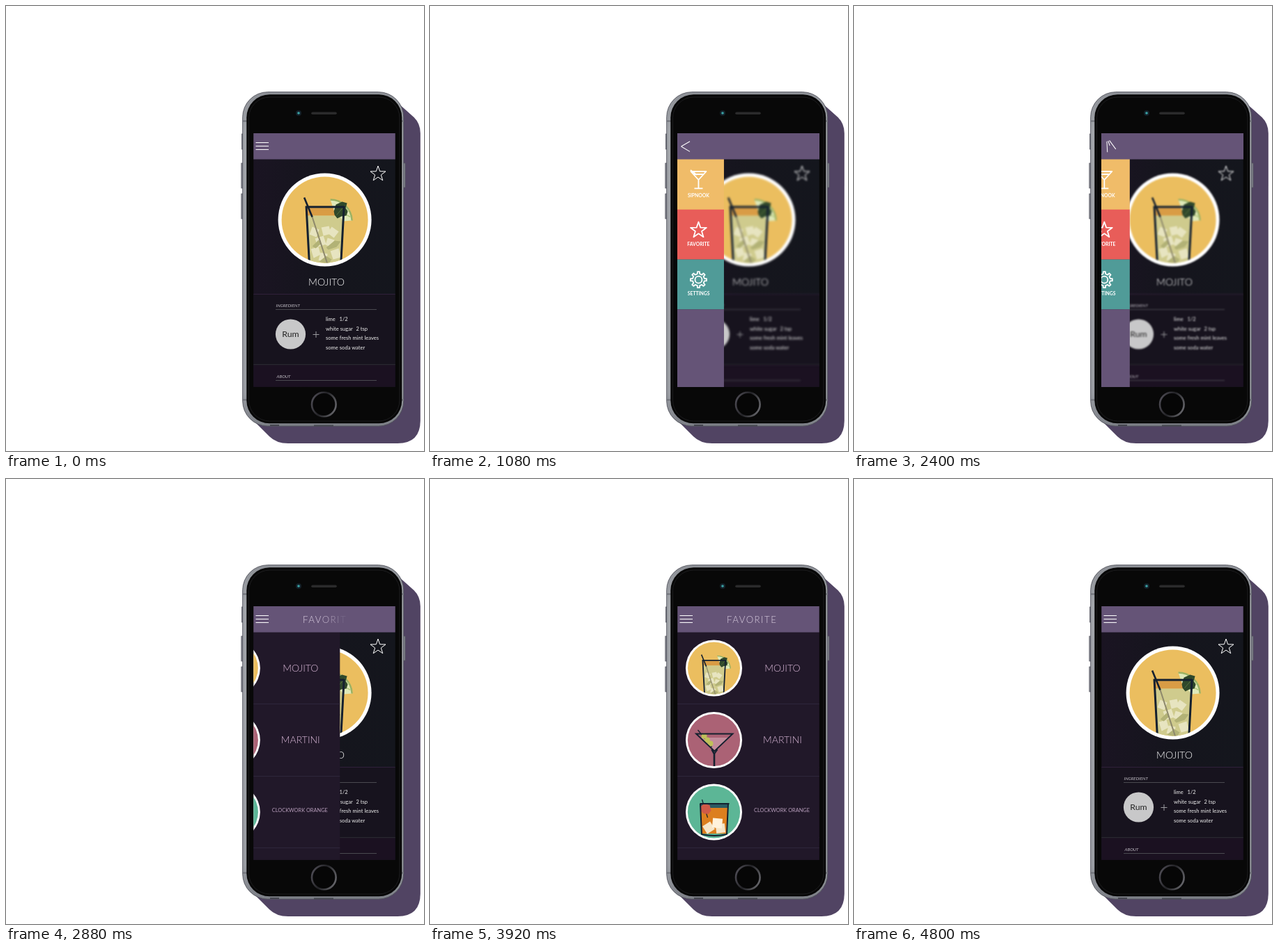
An HTML page that plays this animation: 600 by 640 pixels, repeating every 5440 ms.

```html
<!DOCTYPE html>
<html lang="en">
<head>
<meta charset="utf-8">
<title>Cocktail app</title>
<style>
  html, body { margin: 0; width: 100%; height: 100%; overflow: hidden; background: #fff; }
  svg { display: block; width: 600px; height: 640px; }
  text { font-family: Lato, "Open Sans", sans-serif; }
  .mid { text-anchor: middle; }
  .name { font-size: 14.2px; font-weight: 300; }
  .list text { fill: #dab8d8; font-size: 14px; font-weight: 300; }
  .list .tiny { font-size: 7.4px; font-weight: 400; fill: #b99fbd; }
  .head { font-size: 6.2px; font-style: italic; fill: #c4c0c8; }
  .item { font-size: 7.6px; fill: #eee; }
  .label { font-size: 6.8px; font-weight: 700; fill: #fff; }
  .line { fill: none; stroke: #fff; }
  .navy { fill: none; stroke: #14202f; }
  #title { font-size: 13.2px; font-weight: 300; letter-spacing: 1.5px; fill: #d9cde0; }
</style>
</head>
<body>
<svg viewBox="0 0 600 640">
  <defs>
    <clipPath id="screen"><rect x="355.3" y="183" width="203.4" height="364.7"/></clipPath>
    <clipPath id="disc"><circle r="62"/></clipPath>
    <clipPath id="small"><circle r="37.6"/></clipPath>
    <linearGradient id="rim" x2="0" y2="1">
      <stop offset="0" stop-color="#8d9096"/><stop offset=".12" stop-color="#a2a5aa"/>
      <stop offset=".9" stop-color="#9a9da3"/><stop offset="1" stop-color="#7c7f86"/>
    </linearGradient>
    <linearGradient id="night">
      <stop offset="0" stop-color="#1a1422"/><stop offset=".5" stop-color="#15151d"/>
      <stop offset="1" stop-color="#14161d"/>
    </linearGradient>
    <linearGradient id="home" x1="0" y1=".3" x2="1" y2=".7">
      <stop offset="0" stop-color="#4c4a52"/><stop offset=".45" stop-color="#222226"/>
      <stop offset="1" stop-color="#66666b"/>
    </linearGradient>

    <!-- centred on the disc -->
    <g id="mojito">
      <circle r="67" fill="#fff"/>
      <circle r="62" fill="#ebbe5f"/>
      <g clip-path="url(#disc)">
        <path d="M-26-17H27L26-6H-25.500Z" fill="#d99c45"/>
        <path d="M-25.500-6H26L23 64H-21.500Z" fill="#cfcb8d"/>
        <path d="M-18 10l10 4-4 11-10-4ZM-5 11l11-2 3 11-11 3ZM10 10l10 7-7 9-9-7ZM-14 27l12-4 4 12-12 4ZM4 26l10 3-3 11-10-4ZM-20 42l11-3 3 11-10 5ZM8 45l12-4 3 13-11 3ZM-6 47l10 2-2 12-11-3Z" fill="#e7e4c0"/>
        <path d="M-18 38l9-9 4 5-8 7ZM2 40l12-10 9 1-6 8-12 4ZM-8 60l10-8 8 5-5 7Z" fill="#b2b276"/>
        <path d="M-18-4L4 64" fill="none" stroke="#8d886b" stroke-width="2"/>
      </g>
      <path d="M-29.500-32L-18-4" class="navy" stroke-width="2.600"/>
      <path d="M8-29A31 31 0 0 1 39 1L27 2 13-14Z" fill="#dfe9b9"/>
      <path d="M8-29A31 31 0 0 1 39 1" fill="none" stroke="#9bb263" stroke-width="2.500"/>
      <path d="M18-16L27-23M20-14L35-14M22-12L37-4" stroke="#b4ca7d" stroke-width="1.500"/>
      <path d="M13-12l3-10 9-4 7 2-2 7 3 5-2 6-7 1-6 3-4-5Z" fill="#2f482b"/>
      <path d="M17-7l12-14" stroke="#59713e"/>
      <g clip-path="url(#disc)">
        <path d="M-28-18.500H29M-26.500-18L-22 66M27.500-18L23 66" class="navy" stroke-width="3"/>
      </g>
    </g>

    <g id="martini">
      <circle r="40.500" fill="#fff"/>
      <circle r="37.600" fill="#ab6275"/>
      <path d="M-19-3.500H21L1 14.500Z" fill="#c28c9c"/>
      <path d="M-23-14.500L-3 10" class="navy" stroke-width="1.300"/>
      <g fill="#bfc05a"><circle cx="-14" cy="-6" r="4"/><circle cx="-9.500" cy="0" r="4"/><circle cx="-5" cy="5" r="4"/></g>
      <path d="M-25.500-9H27L.8 16Z" class="navy" stroke-width="1.900"/>
      <path d="M-3 13.500L.5 20V37.500" class="navy" stroke-width="2.600"/>
      <path d="M5 13.500L.5 20" class="navy" stroke-width="2"/>
    </g>

    <g id="orange">
      <circle r="40.500" fill="#fff"/>
      <circle r="37.600" fill="#5cb696"/>
      <g clip-path="url(#small)">
        <path d="M-20-12H21L20.500-6H-19.500Z" fill="#2b5b62"/>
        <path d="M-19.500-6H20.500L18 31H-17Z" fill="#dc7f1f"/>
        <g fill="#f6e6c9">
          <rect x="-14" y="16" width="13" height="13" transform="rotate(-32 -7.500 22.500)"/>
          <rect x="3" y="17" width="13" height="13" transform="rotate(-6 9.500 23.500)"/>
          <rect x="-2" y="9" width="14" height="14" fill="#fff2dc" transform="rotate(5 5 16)"/>
        </g>
        <path d="M-17-18L-9 8" class="navy" stroke-width="1.200"/>
        <path d="M-19-8l5-4 8 2 2 8-4 5-7-1-4-4Z" fill="#cf5a48"/>
        <path d="M-20-12H22M-19.500-12L-17.500 32Q1 36 18.500 32L20.500-12" class="navy" stroke-width="2"/>
      </g>
    </g>
  </defs>

  <!-- phone -->
  <path d="M562 139L585.500 160Q594.800 169 594.800 183V596Q594.800 629 562 629H405Q388 629 378 619L356 597Z" fill="#514463"/>
  <g fill="#85868f" stroke="#55565f" stroke-width=".7">
    <rect x="338.300" y="184" width="4" height="22"/>
    <rect x="337.800" y="226" width="4" height="36"/>
    <rect x="337.800" y="270" width="4" height="36"/>
    <rect x="569" y="226" width="4" height="35"/>
  </g>
  <rect x="339.700" y="123.700" width="231" height="480.500" rx="36" fill="url(#rim)" stroke="#4e505a" stroke-width=".9"/>
  <path d="M340 165.500h6M340 566.500h6M566 165.500h5M566 566.500h5" stroke="#70727a" stroke-width="2"/>
  <path d="M379 603h13M442 603.500h28" stroke="#45464f" stroke-width="2"/>
  <rect x="345.300" y="127.300" width="223" height="473" rx="33" fill="#070707"/>
  <rect x="348.500" y="131" width="216.500" height="466" rx="30" fill="#080808" stroke="#1d1d1f"/>
  <circle cx="420" cy="154" r="4" fill="#142029"/>
  <circle cx="420" cy="154" r="1.800" fill="#3aa3a5"/>
  <path d="M440 154.300h33" stroke="#2b2b2c" stroke-width="3.600" stroke-linecap="round"/>
  <circle cx="456.300" cy="573" r="17.300" fill="#060606" stroke="url(#home)" stroke-width="2.600"/>

  <g clip-path="url(#screen)">
    <rect x="355" y="183" width="204" height="365" fill="url(#night)"/>
    <rect x="355" y="415" width="204" height="101" fill="#17131e"/>
    <rect x="355" y="516" width="204" height="32" fill="#1b1121"/>

    <g id="detail">
      <path d="M340 414.500h240" stroke="#30203a"/>
      <path d="M340 515.700h240" stroke="#2d2d34"/>
      <use href="#mojito" transform="translate(457.600 307.500)"/>
      <path data-star="534 241.500 11.500" class="line"/>
      <text class="mid name" x="460" y="401.500" fill="#fff">MOJITO</text>
      <text class="head" x="387.500" y="433">INGREDIENT</text>
      <text class="head" x="388.500" y="534.500">ABOUT</text>
      <path d="M387 436.500h145M387 538.500h145" stroke="#4a4a50"/>
      <circle cx="408.500" cy="472" r="21.600" fill="#c8c8c9"/>
      <text class="mid" x="408.500" y="476" font-size="12.300" fill="#222">Rum</text>
      <path d="M440.500 472.500h9M445 468v9" stroke="#9a9a9e"/>
      <g class="item">
        <text x="459" y="453">lime</text><text x="478.500" y="453">1/2</text>
        <text x="459" y="466.500">white sugar</text><text x="502.500" y="466.500">2 tsp</text>
        <text x="459" y="480">some fresh mint leaves</text>
        <text x="459" y="493.500">some soda water</text>
      </g>
    </g>

    <g id="menu">
      <rect x="355" y="220" width="67" height="73" fill="#f0bc69"/>
      <rect x="355" y="292.700" width="67" height="72" fill="#e85d59"/>
      <rect x="355" y="364.500" width="67" height="72" fill="#509b98"/>
      <rect x="355" y="436.300" width="67" height="112" fill="#655477"/>
      <g class="line" stroke-width="1.800" stroke-linejoin="round">
        <path d="M374.500 238H396.500L385.500 250ZM385.500 250V262M379.500 262.300H391.500M378.500 242H392.500M374 236l9 7"/>
        <path data-star="385.500 322.500 12"/>
        <path id="gear"/>
        <circle cx="385.500" cy="393.700" r="5"/>
      </g>
      <g class="label mid">
        <text x="385.500" y="274.500">SIPNOOK</text>
        <text x="385.500" y="344.500">FAVORITE</text>
        <text x="385.700" y="416.300">SETTINGS</text>
      </g>
    </g>

    <g id="list" class="list">
      <rect x="340" y="220" width="222.500" height="328" fill="#211829"/>
      <path d="M340 323.500h222.500M340 427.500h222.500M340 530.500h222.500" stroke="#2e263b"/>
      <use href="#mojito" transform="translate(407.500 272) scale(.605)"/>
      <use href="#martini" transform="translate(407.500 375.500)"/>
      <use href="#orange" transform="translate(407.500 479)"/>
      <text class="mid" x="506" y="276.500">MOJITO</text>
      <text class="mid" x="506" y="380">MARTINI</text>
      <text class="mid tiny" x="505" y="478.500">CLOCKWORK ORANGE</text>
    </g>

    <rect x="355" y="183" width="204" height="37.500" fill="#655477"/>
    <path id="icon" class="line" stroke="#d9cfe0"/>
    <text id="title" x="426" y="207"></text>
    <circle id="ring" class="line" stroke-width="2"/>
  </g>
</svg>

<script>
const $ = id => document.getElementById(id);
const clamp = (v, lo = 0, hi = 1) => Math.min(hi, Math.max(lo, v));
const mix = (a, b, p) => a + (b - a) * p;

const LOOP = 5440, STEP = 40;
const MENU = 67, LIST = 225;
// Middle of each move; a tap comes shortly before the move it starts.
const MENU_IN = 760, MENU_OUT = 2420, LIST_IN = 2856, LIST_OUT = 4673;
const taps = [
  { x: 370, y: 200, from: 20, to: 580 },
  { x: 385, y: 330, from: 2040, to: 2260 },
  { x: 469.5, y: 282, from: 4000, to: 4520 }
];

// Strong ease in and out around the given middle.
const ease = (t, middle) => 1 / (1 + Math.exp((middle - t) / 45));
const shown = (t, start, end) => ease(t, start) - ease(t, end);

// Closed outline around a centre: radius(i) gives the distance of point i.
function outline(cx, cy, count, radius, angle) {
  let d = '';
  for (let i = 0; i < count; i++) {
    const a = angle(i), r = radius(i);
    d += (i ? 'L' : 'M') + (cx + r * Math.cos(a)).toFixed(2) + ' ' + (cy + r * Math.sin(a)).toFixed(2);
  }
  return d + 'Z';
}

for (const el of document.querySelectorAll('[data-star]')) {
  const [x, y, r] = el.dataset.star.split(' ').map(Number);
  el.setAttribute('d', outline(x, y, 10, i => i % 2 ? r * 0.4 : r, i => (i / 5 - 0.5) * Math.PI));
}
// Four points for each of the eight teeth.
$('gear').setAttribute('d', outline(385.5, 393.7, 32,
  i => i % 4 < 2 ? 11.6 : 8.6,
  i => (Math.floor(i / 4) + [-0.17, 0.17, 0.25, 0.75][i % 4]) * Math.PI / 4));

const letters = [...'FAVORITE'].map(c => {
  const span = document.createElementNS('http://www.w3.org/2000/svg', 'tspan');
  span.textContent = c;
  $('title').append(span);
  return span;
});

// Three bars turn half round while they fold into an arrow.
function drawIcon(p) {
  const line = (a, b) =>
    `M${mix(a[0], b[0], p)} ${mix(a[1], b[1], p)}L${mix(a[2], b[2], p)} ${mix(a[3], b[3], p)}`;
  $('icon').setAttribute('d',
    line([358.5, 196.5, 377, 196.5], [360.5, 202, 373, 194.7]) +
    line([358.5, 201.5, 377, 201.5], [360.5, 202, 360.5, 202]) +
    line([358.5, 206.5, 377, 206.5], [360.5, 202, 373, 209.3]));
  $('icon').setAttribute('transform', `rotate(${180 * (1 - p)} 367.75 201.5)`);
}

function drawRing(t) {
  const tap = taps.find(k => t > k.from && t < k.to);
  const ring = $('ring');
  ring.style.opacity = 0;
  if (!tap) return;
  const u = (t - tap.from) / (tap.to - tap.from);
  ring.setAttribute('cx', tap.x);
  ring.setAttribute('cy', tap.y);
  ring.setAttribute('r', 15);
  ring.style.opacity = 0.5 * Math.sin(Math.PI * u);
}

function draw(t) {
  const open = shown(t, MENU_IN, MENU_OUT);
  $('menu').setAttribute('transform', `translate(${MENU * (open - 1)} 0)`);
  $('detail').style.filter = open > 0.01 ? `blur(${1.4 * open}px)` : 'none';
  $('list').setAttribute('transform', `translate(${LIST * (shown(t, LIST_IN, LIST_OUT) - 1)} 0)`);
  drawIcon(open);
  const edge = Math.min((t - 2740) / 20 - 5, 7 - (t - 4560) / 20);
  letters.forEach((el, i) => el.setAttribute('fill-opacity', clamp(1 - (i - edge) / 5)));
  drawRing(t);
}

function tick() {
  const t = performance.now() % LOOP;
  draw(Math.floor(t / STEP) * STEP);
  requestAnimationFrame(tick);
}
tick();
</script>
</body>
</html>
```
